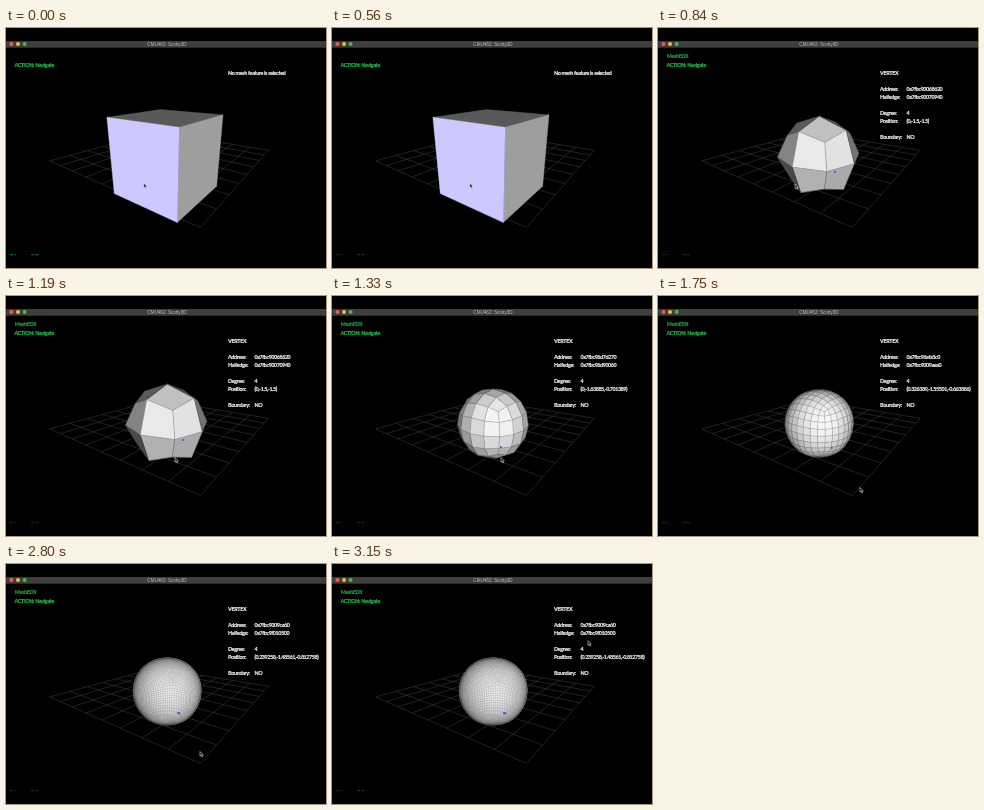
An HTML page with a canvas that plays this animation: 320 by 240 pixels, repeating every 3.78 s.

```html
<!DOCTYPE html>
<html lang="en">
<head>
<meta charset="utf-8">
<title>Subdivision</title>
<style>
  html, body { margin: 0; width: 320px; height: 240px; overflow: hidden; background: #000; }
  canvas, svg { position: absolute; left: 0; top: 0; width: 320px; height: 240px; display: block; }
  text { font: 700 5.4px Lato, sans-serif; letter-spacing: -.32px; fill: #f2f2f2; stroke: #f2f2f2; stroke-width: .2; dominant-baseline: central; white-space: pre; }
  .value { letter-spacing: -.42px; }
  .green { fill: #1fb84a; stroke: #1fb84a; }
  #mode { fill: #189a3c; stroke: #189a3c; }
  .title { font: 400 4.6px "Liberation Sans", Arial, sans-serif; letter-spacing: 0; fill: #c4c4c4; stroke: none; text-anchor: middle; }
</style>
</head>
<body>
<canvas id="view"></canvas>
<svg viewBox="0 0 320 240">
  <rect y="13" width="320" height="6.7" fill="#3e3e3e"/>
  <circle cx="5.4" cy="16.1" r="2" fill="#f25a52"/>
  <circle cx="12" cy="16.1" r="2" fill="#eebb3c"/>
  <circle cx="18.6" cy="16.1" r="2" fill="#3fbf48"/>
  <text class="title" x="161" y="16.2">CMU462: Scotty3D</text>
  <text class="green" id="mode" x="8.7" y="28.4">MeshEDIt</text>
  <text class="green" x="8.5" y="36.8">ACTION: Navigate</text>
  <path id="foot" d="M4 226.7h3M8.5 226.7h1.5M25 226.7h3M29 226.7h3.5"/>
  <g id="info"></g>
  <ellipse id="dot" ry="1.1" fill="#5553dd"/>
  <path id="cursor" d="M0 0V4.6L1.1 3.7L1.9 5.5L2.7 5.1L1.9 3.4H3.3Z" fill="#0a0a0a" stroke="#eee" stroke-width=".55"/>
</svg>
<script>
const LOOP = 3780, TICK = 70;
const $ = id => document.getElementById(id);

// Camera: looks at the origin from distance DIST, tilted down
const FOCAL = 201, DIST = 10.35, CX = 161.3, CY = 127.2;
const SIN = .3256, COS = .9455, AX = .8035, AY = .595;
const EYE = [-DIST * COS * AY, -DIST * COS * AX, DIST * SIN];
const LIGHT = [-.6, -.65, .33];

const add = (...vs) => [0, 1, 2].map(k => vs.reduce((s, v) => s + v[k], 0));
const mul = (v, s) => v.map(c => c * s);
const sub = (a, b) => a.map((c, k) => c - b[k]);
const dot = (a, b) => a[0] * b[0] + a[1] * b[1] + a[2] * b[2];
const cross = (a, b) => [
  a[1] * b[2] - a[2] * b[1], a[2] * b[0] - a[0] * b[2], a[0] * b[1] - a[1] * b[0]
];
const mean = vs => mul(add(...vs), 1 / vs.length);

function project([p, q, up]) {
  const right = -AX * p + AY * q, ahead = AY * p + AX * q;
  const scale = FOCAL / (DIST + ahead * COS - up * SIN);
  return [CX + right * scale, CY - (ahead * SIN + up * COS) * scale];
}

const cube = {
  verts: [...Array(8).keys()].map(i => [i & 1, i >> 1 & 1, i >> 2].map(b => b * 4 - 2)),
  faces: [[4, 5, 7, 6], [0, 2, 3, 1], [1, 3, 7, 5], [0, 4, 6, 2], [0, 1, 5, 4], [2, 6, 7, 3]]
};

// One Catmull-Clark step
function subdivide({ verts, faces }) {
  const out = verts.slice(), quads = [], edges = new Map();
  const around = verts.map(() => ({ faces: [], mids: [] }));
  const centers = faces.map(f => mean(f.map(i => verts[i])));
  const edgeKey = (a, b) => Math.min(a, b) + '/' + Math.max(a, b);
  faces.forEach((f, n) => f.forEach((a, k) => {
    const b = f[(k + 1) % 4], key = edgeKey(a, b);
    around[a].faces.push(centers[n]);
    if (!edges.has(key)) {
      edges.set(key, { a, b, sides: [] });
      const mid = mean([verts[a], verts[b]]);
      around[a].mids.push(mid);
      around[b].mids.push(mid);
    }
    edges.get(key).sides.push(centers[n]);
  }));
  verts.forEach((v, i) => {
    const { faces: fs, mids } = around[i], n = fs.length;
    out[i] = mul(add(mean(fs), mul(mean(mids), 2), mul(v, n - 3)), 1 / n);
  });
  for (const e of edges.values())
    e.id = out.push(mean([verts[e.a], verts[e.b], ...e.sides])) - 1;
  const edgeId = (a, b) => edges.get(edgeKey(a, b)).id;
  faces.forEach((f, n) => {
    const c = out.push(centers[n]) - 1;
    f.forEach((a, k) => quads.push([a, edgeId(a, f[(k + 1) % 4]), c, edgeId(f[(k + 3) % 4], a)]));
  });
  return { verts: out, faces: quads };
}

const dpr = window.devicePixelRatio || 1;
function sizeCanvas(c) {
  c.width = 320 * dpr;
  c.height = 240 * dpr;
  return c;
}

function drawGrid(g) {
  g.strokeStyle = '#383838';
  g.lineWidth = .6;
  g.beginPath();
  for (let i = -4; i <= 4; i++) {
    for (const [a, b] of [[[i, -4, 0], [i, 4, 0]], [[-4, i, 0], [4, i, 0]]]) {
      g.moveTo(...project(a));
      g.lineTo(...project(b));
    }
  }
  g.stroke();
}

// Per level: added ambient light and mesh line width
const LIFT = [0, .04, .22, .3, .32, .36];
const EDGE = [0, .4, .32, .28, .25, .17];

function renderMesh({ verts, faces }, level) {
  const c = sizeCanvas(document.createElement('canvas')), g = c.getContext('2d');
  g.scale(dpr, dpr);
  g.lineJoin = 'round';
  drawGrid(g);
  const shown = [];
  for (const f of faces) {
    const [a, b, d, e] = f.map(i => verts[i]);
    const raw = cross(sub(d, a), sub(e, b)), n = mul(raw, 1 / Math.hypot(...raw));
    if (dot(n, sub(EYE, mean([a, b, d, e]))) <= 0) continue;
    const path = new Path2D();
    [a, b, d, e].forEach(v => path.lineTo(...project(v)));
    path.closePath();
    let s = Math.max(.05, .02 + dot(n, LIGHT));
    s = Math.round(255 * (s + (1 - s) * LIFT[level]));
    const hovered = !level && n[1] < -.9;
    g.fillStyle = g.strokeStyle = hovered ? '#cdc8ff' : `rgb(${s},${s},${s})`;
    g.lineWidth = .4;
    g.fill(path);
    g.stroke(path);
    shown.push(path);
  }
  if (level) {
    g.strokeStyle = 'rgba(0,0,0,.5)';
    g.lineWidth = EDGE[level] / 2;
    shown.forEach(p => g.stroke(p));
  }
  return c;
}

// start time, selected vertex marker [x, y, half width], readout
const stages = [
  { at: 0 },
  { at: 840, mark: [177, 144, 1.2], info: ['0x7fbc90068620', '0x7fbc90070940', '(0,-1.5,-1.5)'] },
  { at: 1330, mark: [168.8, 151.2, 1.1], info: ['0x7fbc96d7d270', '0x7fbc96d90060', '(0,-1.63885,-0.701389)'] },
  { at: 1750, mark: [173.8, 151.8, 1.2], info: ['0x7fbc96efa5c0', '0x7fbc9009aea0', '(0.326389,-1.55501,-0.663886)'] },
  { at: 2030, mark: [174.7, 149.2, 1.2], info: ['0x7fbc96effbc0', '0x7fbc9cbcc5e0', '(0.318221,-1.47781,-0.809103)'] },
  { at: 2800, mark: [172.8, 149.2, 1.9], info: ['0x7fbc9009ca60', '0x7fbc9f010500', '(0.239258,-1.48561,-0.812758)'] }
];
let mesh = cube;
stages.forEach((s, level) => {
  if (level) mesh = subdivide(mesh);
  s.image = renderMesh(mesh, level);
});

// Cursor tip: time, x, y
const track = [
  [0, 137.8, 155.2], [770, 137.8, 155.2], [840, 137, 156], [1190, 169, 161.5],
  [1330, 169, 161.5], [1610, 202, 191.5], [1750, 202, 191.5], [2240, 194.8, 188.2],
  [2380, 194, 187.5], [2940, 194, 187.5], [3150, 256, 76.6], [LOOP, 256, 76.6]
];
function cursorAt(t) {
  const i = track.findIndex(k => k[0] > t), [t0, x0, y0] = track[i - 1], [t1, x1, y1] = track[i];
  const u = (t - t0) / (t1 - t0);
  return [x0 + (x1 - x0) * u, y0 + (y1 - y0) * u];
}

const line = (x, y, s, kind = 'label') => `<text class="${kind}" x="${x}" y="${y}">${s}</text>`;
function readout(info) {
  if (!info) return line(222, 44.8, 'No mesh feature is selected');
  const [address, halfedge, position] = info;
  const rows = [
    [60.7, 'Address:', address], [69, 'Halfedge:', halfedge], [85, 'Degree:', '4'],
    [93.2, 'Position:', position], [109.2, 'Boundary:', 'NO']
  ];
  return line(222, 44.6, 'VERTEX') + rows.map(([y, name, value]) =>
    line(222, y, name) + line(248.5, y, value, 'value')).join('');
}

const view = sizeCanvas($('view')).getContext('2d');
let current = null;
function show(stage) {
  current = stage;
  view.clearRect(0, 0, 320 * dpr, 240 * dpr);
  view.drawImage(stage.image, 0, 0);
  $('info').innerHTML = readout(stage.info);
  $('mode').style.display = $('dot').style.display = stage.info ? '' : 'none';
  if (!stage.mark) return;
  const [x, y, rx] = stage.mark;
  Object.entries({ cx: x, cy: y, rx }).forEach(([k, v]) => $('dot').setAttribute(k, v));
}

const start = performance.now();
function frame() {
  const t = Math.floor((performance.now() - start) % LOOP / TICK) * TICK;
  const stage = stages.filter(s => s.at <= t).pop();
  if (stage !== current) show(stage);
  $('cursor').setAttribute('transform', `translate(${cursorAt(t)})`);
  $('foot').setAttribute('stroke', t < 560 ? '#177a30' : '#0c3524');
  requestAnimationFrame(frame);
}
frame();
</script>
</body>
</html>
```
